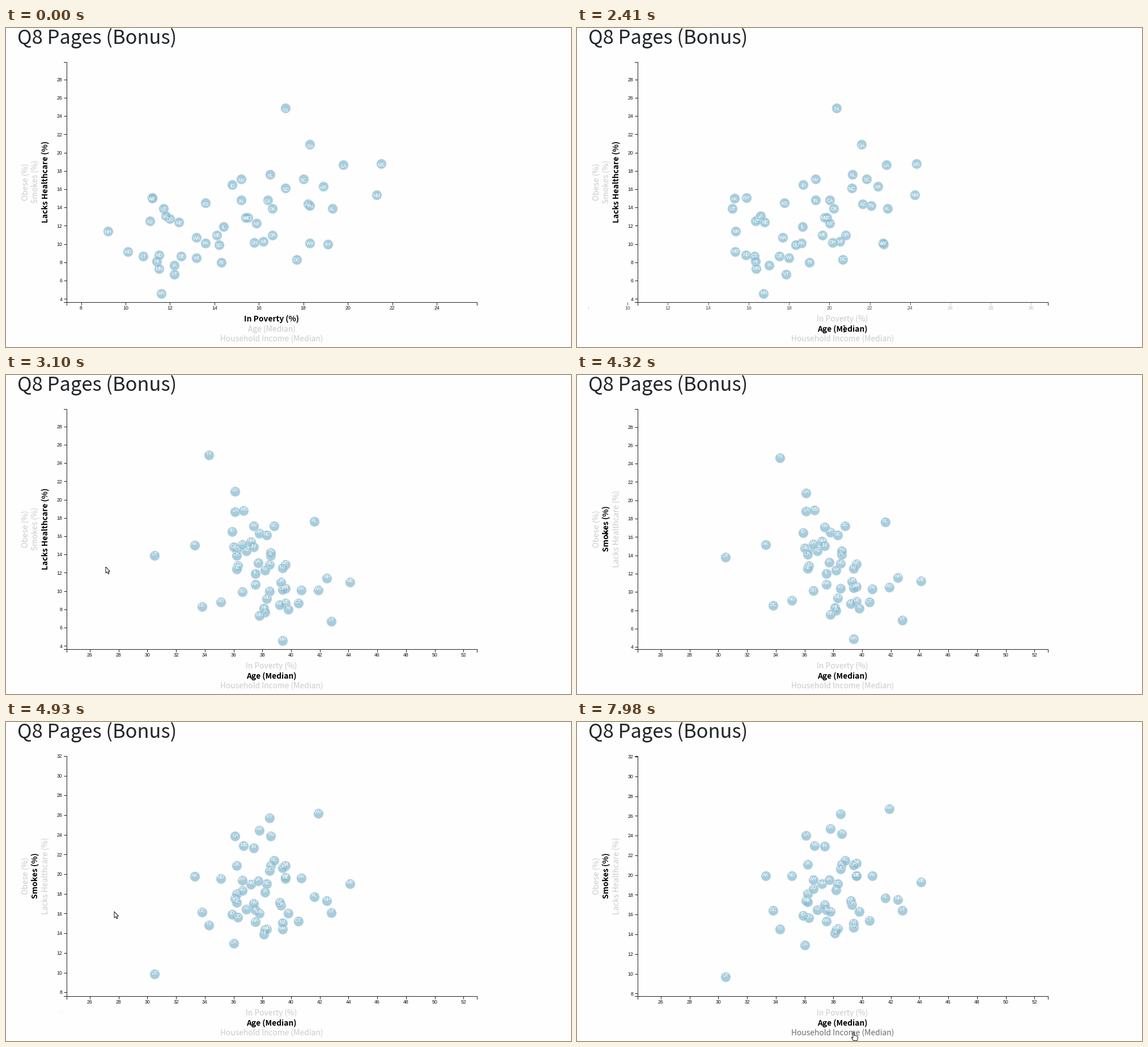
A matplotlib script that plays this animation: 997x562 px, repeating every 8 s.

```python
import matplotlib.pyplot as plt
import numpy as np
from matplotlib.animation import FuncAnimation
from matplotlib.collections import LineCollection
from matplotlib.patches import FancyBboxPatch, Polygon, Rectangle

W, H, LOOP, STEP = 997, 562, 8000, 40
LEFT, RIGHT, TOP, BOTTOM = 107.4, 830.6, 60.3, 482.6
BG = "#fefefe"
SANS, UI = "Liberation Sans", "Noto Sans CJK JP"

STATES = ("AL AK AZ AR CA CO CT DE DC FL GA HI ID IL IN IA KS KY LA ME MD MA MI MN MS MO "
          "MT NE NV NH NJ NM NY NC ND OH OK OR PA RI SC SD TN TX UT VT VA WA WV WI WY").split()
poverty = np.array([
    19.3, 11.2, 18.2, 18.9, 16.4, 12, 10.8, 12.5, 17.7, 16.5, 18.3, 11.4, 14.8,
    14.4, 15.2, 12.2, 13.6, 19.1, 19.8, 14.1, 10.1, 11.6, 16.2, 11.5, 21.5, 15.5,
    15.4, 12.4, 15.2, 9.2, 11.1, 21.3, 15.9, 17.2, 11.5, 15.8, 16.6, 16.6, 13.6,
    14.3, 18, 14.2, 18.3, 17.2, 11.7, 12.2, 11.8, 13.2, 18.3, 13.2, 11.2])
age = np.array([
    38.6, 33.3, 36.9, 37.8, 36, 36.3, 40.5, 39.6, 33.8, 41.6, 36.1, 38.1, 35.9,
    37.5, 37.4, 38.2, 36.2, 38.5, 36.1, 44.1, 38.3, 39.4, 39.6, 37.8, 36.7, 38.5,
    39.6, 36.2, 37.4, 42.5, 39.4, 37.2, 38.2, 38.3, 35.1, 39.4, 36.2, 39.3, 40.7,
    39.8, 38.8, 36.6, 38.6, 34.3, 30.5, 42.8, 37.7, 37.5, 41.9, 39.2, 36.6])
healthcare = np.array([
    13.9, 15, 14.4, 16.3, 14.8, 12.8, 8.7, 8.7, 8.3, 17.6, 20.9, 8.1, 16.5,
    11.9, 14.8, 7.7, 14.5, 10, 18.7, 11, 9.2, 4.6, 10.3, 7.3, 18.8, 12.9,
    12.9, 12.4, 17.1, 11.4, 12.5, 15.4, 12.3, 16.1, 8.8, 10.2, 13.9, 11, 10.1,
    8, 17.1, 9.9, 14.2, 24.9, 13.9, 6.7, 13.1, 10.7, 10.1, 8.5, 15.1])
smokes = np.array([
    21.1, 19.9, 16.5, 24.7, 12.9, 15.7, 15.4, 19.9, 16.4, 17.7, 17.4, 14.1, 15.9,
    16.5, 22.9, 18.5, 18.1, 26.2, 24, 19.3, 14.6, 14.7, 21.2, 16.3, 23, 20.6,
    19.9, 17.3, 17, 17.5, 15.1, 19.1, 14.4, 19.1, 19.9, 21, 21.1, 17, 19.9,
    16.3, 21.5, 18.6, 24.2, 14.5, 9.7, 16.4, 19.5, 15.3, 26.7, 17.4, 19.5])

X_CLICK, Y_CLICK = 2008, 4133

# moments at which the screen refreshes: first, last, count
BURSTS = [(0, 0, 1), (450, 450, 1), (690, 940, 4), (1090, 1880, 11), (1960, 2710, 11),
          (2790, 3100, 5), (3250, 4010, 11), (4160, 4930, 11), (5010, 5800, 11),
          (5880, 5880, 1), (6030, 6030, 1), (7050, 7360, 5), (7510, 7980, 7)]
REFRESH = np.concatenate([np.linspace(*b) for b in BURSTS])

# pointer path: time, x, y
PATH = np.array([(450, 870, 550), (620, 870, 550), (940, 513, 486), (1050, 513, 486),
                 (1650, 471, 530), (2710, 471, 529), (3100, 176, 338), (3200, 176, 338),
                 (3900, 51, 275), (4500, 52, 275), (4930, 191, 334), (5780, 330, 271),
                 (6990, 330, 271), (7360, 468, 487), (7450, 468, 487), (7960, 488, 547)])


def scale(data, start, end):
    lo, hi = data.min() * 0.8, data.max() * 1.2
    return lambda v: start + (v - lo) / (hi - lo) * (end - start)


def ease(t):
    t = min(max(t, 0), 1)
    return 4 * t ** 3 if t < 0.5 else 1 - 4 * (1 - t) ** 3


def mix(a, b, f):
    return a + (b - a) * f


def pointer(t):
    times = PATH[:, 0]
    i = min(max(np.searchsorted(times, t, "right") - 1, 0), len(PATH) - 2)
    f = min(max((t - times[i]) / (times[i + 1] - times[i]), 0), 1)
    return mix(PATH[i, 1:], PATH[i + 1, 1:], (1 - np.cos(np.pi * f)) / 2)


x_old, x_new = scale(poverty, LEFT, RIGHT), scale(age, LEFT, RIGHT)
y_old, y_new = scale(healthcare, BOTTOM, TOP), scale(smokes, BOTTOM, TOP)

# at 72 dpi one point is one pixel
fig = plt.figure(figsize=(W / 72, H / 72), dpi=72, facecolor=BG)
ax = fig.add_axes([0, 0, 1, 1])
ax.set_xlim(0, W)
ax.set_ylim(H, 0)
ax.axis("off")


def write(x, y, s, size, font=UI, **kw):
    kw = {"ha": "center", "va": "baseline", "zorder": 4, **kw}
    return ax.text(x, y, s, fontsize=size, family=font, **kw)


write(20.5, 28.5, "Q8 Pages (Bonus)", 34.5, ha="left", color="#212529", zorder=8)

# side strips hide ticks that slide off the chart
for x, w in ((0, 20), (861, W - 861)):
    ax.add_patch(Rectangle((x, 45), w, H - 45, color=BG, lw=0, zorder=7))

ax.plot([LEFT, LEFT, RIGHT, RIGHT], [BOTTOM + 5.2, BOTTOM, BOTTOM, BOTTOM + 5.2],
        color="#222222", lw=1, zorder=3)
ax.plot([LEFT - 5.2, LEFT, LEFT, LEFT - 5.2], [TOP, TOP, BOTTOM, BOTTOM],
        color="#222222", lw=1, zorder=3)


class Ticks:
    def __init__(self, old, new, old_scale, new_scale, horizontal):
        self.values = sorted(set(old) | set(new))
        self.old, self.new = set(old), set(new)
        self.scales = old_scale, new_scale
        self.horizontal = horizontal
        self.labels = [write(LEFT - 8, BOTTOM + 13.7, str(v), 8.8, SANS, color="#111111",
                             ha="center" if horizontal else "right") for v in self.values]
        self.marks = LineCollection([], linewidths=1, zorder=3)
        ax.add_collection(self.marks)

    def update(self, f):
        lines, colors = [], []
        for v, label in zip(self.values, self.labels):
            p = mix(self.scales[0](v), self.scales[1](v), f)
            alpha = (v in self.old) * (1 - f) + (v in self.new) * f
            label.set_visible(alpha > 0.005)
            label.set_alpha(alpha)
            if self.horizontal:
                label.set_x(p)
                lines.append([(p, BOTTOM), (p, BOTTOM + 5.2)])
            else:
                label.set_y(p + 3.2)
                lines.append([(LEFT - 5.2, p), (LEFT, p)])
            colors.append((0.13, 0.13, 0.13, alpha))
        self.marks.set_segments(lines)
        self.marks.set_color(colors)


x_ticks = Ticks(range(8, 25, 2), range(26, 53, 2), x_old, x_new, True)
y_ticks = Ticks(range(4, 29, 2), range(8, 33, 2), y_old, y_new, False)

dots = ax.scatter(poverty, healthcare, s=17.2 ** 2, facecolor="#89bdd3",
                  edgecolor="#e3e3e3", linewidth=0.9, alpha=0.75, zorder=5)
names = [write(0, 0, s, 8.6, SANS, color="white", zorder=6) for s in STATES]


class Label:
    def __init__(self, text, pos, half, vertical=False):
        self.pos = pos
        self.half = (8, half) if vertical else (half, 8)
        x, y = (pos + 5, 271) if vertical else (468.5, pos + 5)
        self.box = (pos, 271) if vertical else (468.5, pos)
        self.art = write(x, y, text, 13.8, rotation=90 if vertical else 0,
                         rotation_mode="anchor")
        self.active = False

    def contains(self, p):
        return all(abs(p[i] - self.box[i]) <= self.half[i] for i in (0, 1))

    def update(self, active, hover):
        self.active = active
        self.art.set_weight("bold" if active else "normal")
        self.art.set_color("black" if active else "#6c6c6c" if hover else "#cbcbcb")


pov_label = Label("In Poverty (%)", 512, 46)
age_label = Label("Age (Median)", 530, 42)
income_label = Label("Household Income (Median)", 547, 82)
care_label = Label("Lacks Healthcare (%)", 69, 66, True)
smoke_label = Label("Smokes (%)", 51.5, 36, True)
obese_label = Label("Obese (%)", 34, 31, True)
labels = [pov_label, age_label, income_label, care_label, smoke_label, obese_label]

tip = [FancyBboxPatch((366.5, 289), 87.5, 47.5, boxstyle="round,pad=4,rounding_size=4",
                      fc="black", alpha=0.8, lw=0, zorder=9)]
ax.add_patch(tip[0])
for i, s in enumerate(("States: AK", "Age (Median): 33.3", "Smokes (%): 19.9")):
    tip.append(write(410.2, 302.3 + 15.2 * i, s, 10.6, color="white", zorder=10))

ARROW = np.array([(0, 0), (0, 11), (2.5, 8.8), (4.3, 12.6), (6, 11.8), (4.3, 8.2), (7.5, 8)])
HAND = np.array([(-1, 0.5), (0, -0.5), (1, 0.5), (1, 5), (6, 6), (7.5, 7.5), (7.5, 10),
                 (6, 14.5), (0, 14.5), (-3.5, 9.5), (-3, 8), (-1, 9.5)])
arrow = Polygon(ARROW, fc="white", ec="black", lw=0.9, zorder=12)
hand = Polygon(HAND, fc="white", ec="black", lw=0.9, zorder=12)
ax.add_patch(arrow)
ax.add_patch(hand)
beam = LineCollection([], colors="black", linewidths=1, zorder=12)
ax.add_collection(beam)


def place_pointer(p, kind):
    x, y = p
    arrow.set_xy(ARROW + p)
    hand.set_xy(HAND + p)
    beam.set_segments([[(x, y - 5.5), (x, y + 5.5)], [(x - 2, y - 5.5), (x + 2, y - 5.5)],
                       [(x - 2, y + 5.5), (x + 2, y + 5.5)]])
    for art, name in ((arrow, "arrow"), (hand, "hand"), (beam, "beam")):
        art.set_visible(kind == name)


def draw(n):
    t = REFRESH[REFRESH <= n * STEP + STEP - 1][-1]
    fx, fy = ease((t - X_CLICK) / 1000), ease((t - Y_CLICK) / 1000)
    x_ticks.update(fx)
    y_ticks.update(fy)

    x = mix(x_old(poverty), x_new(age), fx)
    y = mix(y_old(healthcare), y_new(smokes), fy)
    dots.set_offsets(np.column_stack([x, y]))
    shift = mix((healthcare - 4.6) * 0.25 - 1, -2.7, fx)
    for name, px, py in zip(names, x, y + shift + 3):
        name.set_position((px, py))

    p = pointer(t)
    active = {age_label if t >= X_CLICK else pov_label,
              smoke_label if t >= Y_CLICK else care_label}
    kind = "arrow"
    for label in labels:
        over = t >= 450 and label.contains(p)
        label.update(label in active, over)
        if over:
            kind = "beam" if label.active else "hand"

    k = STATES.index("AK")
    on_dot = t > 5010 and np.hypot(p[0] - x[k], p[1] - y[k]) < 9
    for art in tip:
        art.set_visible(on_dot)
    if on_dot:
        kind = "beam"
    if t < 450 or 5880 <= t < 6030:
        kind = None
    place_pointer(p, kind)


anim = FuncAnimation(fig, draw, frames=LOOP // STEP, interval=STEP, repeat=True,
                     repeat_delay=0, init_func=lambda: draw(0))
plt.show()
```
